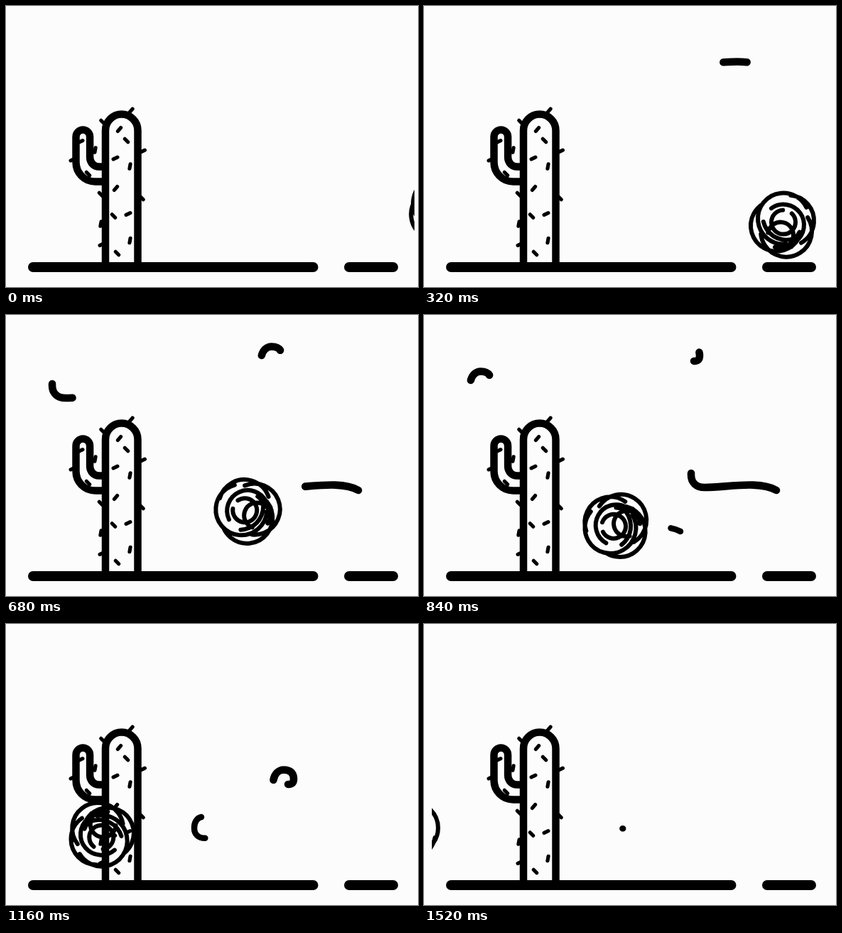
An HTML page with a canvas for the animation above (1.56 s loop, 580 by 396 pixels).

```html
<!DOCTYPE html>
<html lang="en">
<head>
<meta charset="utf-8">
<title>Tumbleweed</title>
<style>
  html, body { margin: 0; width: 100%; height: 100%; overflow: hidden; background: #fcfcfc; }
  canvas { display: block; }
</style>
</head>
<body>
<canvas id="stage" width="580" height="396"></canvas>
<script>
const ctx = document.getElementById('stage').getContext('2d');
const LOOP = 1560, STEP = 40;
const radians = degrees => degrees * Math.PI / 180;

function stroke(path, width) {
  ctx.lineWidth = width;
  ctx.stroke(path);
}

const ground = new Path2D('M38 368H432.5M483 368H545');
const cactus = new Path2D('M140 361V175.5A22.75 23 0 0 1 185.5 175.5V361' +
  'M140 247.5H126C110 247.5 98.5 235 98.5 220V184.5A9.8 10 0 0 1 118.1 184.5V213C118.1 221 124 226.5 131 226.5H140');

// Needles share four slants; each is placed by its middle.
const needles = {
  45: [[136, 163.5], [169.5, 189.5], [191, 270.5], [151.5, 296], [156.5, 348.5], [133.5, 265.5], [115.5, 236.5]],
  130: [[176, 147.5], [159.5, 174], [154.5, 257]],
  155: [[192.5, 204.5], [154, 214.5], [172, 293], [135, 336], [94, 216.5], [105, 191]],
  100: [[174.5, 226], [174.5, 330.5], [133.5, 307], [125.5, 203]]
};
const spines = new Path2D();
for (const [slant, middles] of Object.entries(needles)) {
  const dx = 3.2 * Math.cos(radians(slant)), dy = 3.2 * Math.sin(radians(slant));
  for (const [x, y] of middles) {
    spines.moveTo(x - dx, y - dy);
    spines.lineTo(x + dx, y + dy);
  }
}

// The weed is a tangle of open rings around its middle.
const weed = new Path2D();
function ring(x, y, radius, from, to) {
  const arc = new Path2D();
  arc.arc(x, y, radius, radians(from), radians(to));
  weed.addPath(arc);
}
const OUTER = 36;
ring(8, -5, OUTER, -85, 60);
ring(-9, 2, OUTER, 28, 236);
ring(1, -8, OUTER, 84, 334);
ring(5, 10, OUTER, -33, 174);
ring(5, -11, 33, 56, 167);
ring(1, 1, 29, -126, 68);
ring(1, -3, 17, -46, 267);
ring(-3, 15, 18, 190, 375);
for (let i = 0; i < 3; i++) ring(0, 0, 26 + 4 * i, 25 + 22 * i, 65 + 22 * i);

// The drift starts slowly, so it passes through a few [time, x] keys.
const drift = [[0, 614], [320, 505], [680, 339], [1160, 135], [1520, -24]];

function driftX(t) {
  const last = drift.length - 1;
  const i = Math.max(0, drift.findIndex(key => key[0] >= t) - 1);
  const slope = n => {
    const a = drift[Math.max(0, n - 1)], b = drift[Math.min(last, n + 1)];
    return (b[1] - a[1]) / (b[0] - a[0]);
  };
  const [t0, x0] = drift[i], [t1, x1] = drift[i + 1], span = t1 - t0, u = (t - t0) / span;
  return x0 + (x1 - x0) * u * u * (3 - 2 * u)
    + span * u * (1 - u) * (slope(i) * (1 - u) - slope(i + 1) * u);
}

const bounceY = t => 293 - 18.5 * Math.cos(2 * Math.PI * (t - 620) / 760);

function drawWeed(t) {
  ctx.save();
  ctx.beginPath();
  ctx.rect(11, 0, 564, 396);
  ctx.clip();
  ctx.translate(driftX(t), bounceY(t));
  ctx.rotate(radians((320 - t) * 0.22));
  stroke(weed, 6);
  ctx.restore();
}

// A gust runs left from its origin, then curls up and over.
const gustShape = 'M0 0C-24 -14 -70 -4 -101 -4C-113 -4 -120 -11 -120 -22' +
  'C-120 -33 -114 -41.5 -105 -41.5S-91 -37 -91 -29S-95 -21 -102 -21';
const gust = new Path2D(gustShape);
const probe = document.createElementNS('http://www.w3.org/2000/svg', 'path');
probe.setAttribute('d', gustShape);
const gustLength = probe.getTotalLength();

// Head and tail are each [start, duration].
const gusts = [
  { x: 479, y: 86, scale: 1, head: [200, 740], tail: [250, 740] },
  { x: 185, y: 121, scale: 1, head: [360, 740], tail: [410, 740] },
  { x: 496, y: 247, scale: 1, head: [520, 740], tail: [860, 525] },
  { x: 361, y: 305, scale: 0.8, head: [810, 640], tail: [900, 640] }
];

function easeOut(t, [start, duration], power) {
  const u = Math.max(0, Math.min(1, (t - start) / duration));
  return 1 - (1 - u) ** power;
}

function drawGust({ x, y, scale, head, tail }, t) {
  const to = gustLength * easeOut(t, head, 2), from = gustLength * easeOut(t, tail, 1.4);
  if (to <= from) return;
  ctx.save();
  ctx.translate(x, y);
  ctx.scale(scale, scale);
  ctx.setLineDash([to - from, 1000]);
  ctx.lineDashOffset = -from;
  stroke(gust, 10.6);
  ctx.restore();
}

function draw(t) {
  ctx.fillStyle = '#fcfcfc';
  ctx.fillRect(0, 0, 580, 396);
  ctx.strokeStyle = '#000';
  ctx.lineCap = 'butt';
  stroke(cactus, 10.5);
  ctx.lineCap = 'round';
  stroke(spines, 5.2);
  stroke(ground, 14);
  gusts.forEach(g => drawGust(g, t));
  drawWeed(t);
}

const start = performance.now();
function tick() {
  const t = (performance.now() - start) % LOOP;
  draw(Math.floor(t / STEP) * STEP);
  requestAnimationFrame(tick);
}
tick();
</script>
</body>
</html>
```
